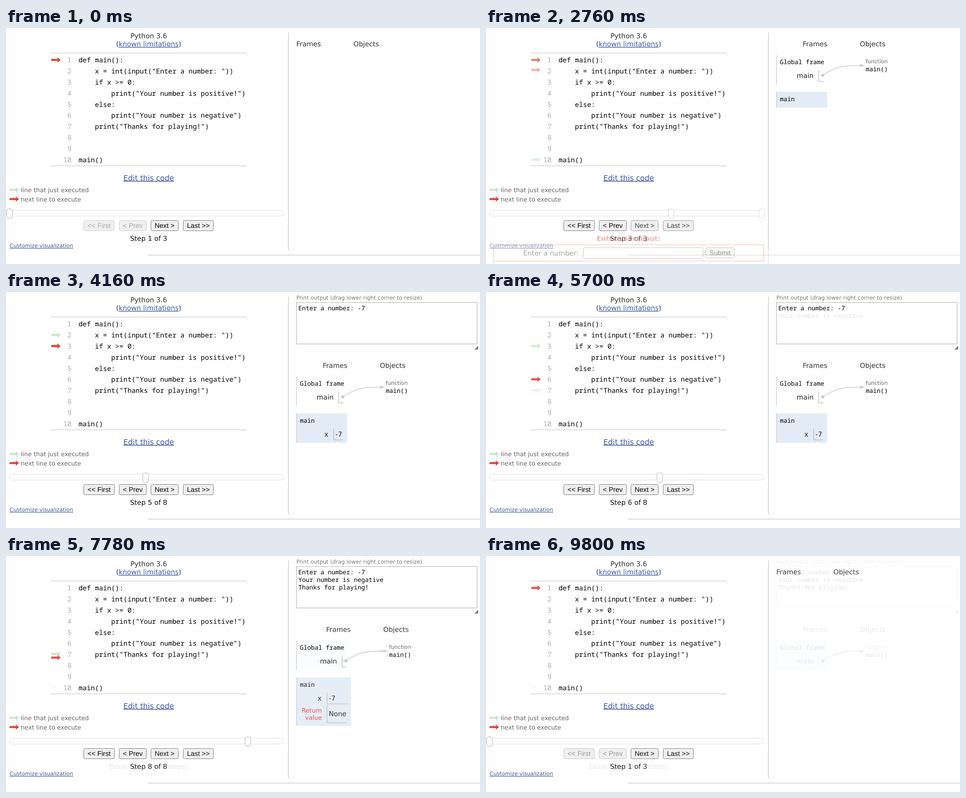
An HTML page for the animation above (9.86 s loop, 1058 px wide and 529 px high).

```html
<!DOCTYPE html>
<html lang="en">
<head>
<meta charset="utf-8">
<title>Code stepper</title>
<style>
html, body { margin: 0; width: 100%; height: 100%; overflow: hidden; background: #fff; }
svg { position: absolute; left: 0; top: 0; background: #fff; }
text { white-space: pre; text-rendering: geometricPrecision; font-family: "DejaVu Sans", Verdana, sans-serif; }
.mono { font-family: "Noto Sans Mono", Consolas, monospace; }
.btn { font-family: "Liberation Sans", Arial, sans-serif; }
</style>
</head>
<body>
<script>
const RED = '#e93f34', GREEN = '#c9e6ca', LINK = '#3d58a2', ACTIVE = '#e2ebf6';
const CODE = [
  'def main():',
  '    x = int(input("Enter a number: "))',
  '    if x >= 0:',
  '        print("Your number is positive!")',
  '    else:',
  '        print("Your number is negative")',
  '    print("Thanks for playing!")',
  '', '', 'main()'
];
const OUTPUT = ['Enter a number: -7', 'Your number is negative', 'Thanks for playing!'];

// green / red: line of each arrow; active: highlighted frame; out: printed lines
const STATES = [
  { red: 1, step: 1, total: 3 },
  { green: 1, red: 10, step: 2, total: 3, active: 'global' },
  { green: 10, red: 1, step: 3, total: 3, active: 'main' },
  { green: 1, red: 2, redShift: -2.4, step: 4, total: 3, active: 'main', input: true },
  { green: 2, red: 3, step: 5, total: 8, active: 'main', out: 1 },
  { green: 3, red: 6, step: 6, total: 8, active: 'main', out: 1 },
  { green: 6, red: 7, step: 7, total: 8, active: 'main', out: 2 },
  { green: 7, greenShift: -1.2, red: 7, redShift: 7.2, step: 8, total: 8, active: 'main', out: 3, returned: true },
  { green: 10, step: 9, total: 8, active: 'global', out: 3 }
];

const esc = s => s.replace(/&/g, '&amp;').replace(/</g, '&lt;');
const text = (x, y, size, s, fill = '#222', attrs = '') =>
  `<text x="${x}" y="${y}" font-size="${size}" fill="${fill}" ${attrs}>${esc(s)}</text>`;
const mono = (x, y, size, s, fill = '#000', attrs = '') => text(x, y, size, s, fill, 'class="mono" ' + attrs);
const rect = (x, y, w, h, fill, stroke = 'none', r = 0, sw = 1) =>
  `<rect x="${x}" y="${y}" width="${w}" height="${h}" rx="${r}" fill="${fill}" stroke="${stroke}" stroke-width="${sw}"/>`;
const path = (d, stroke, sw = 1) => `<path d="${d}" fill="none" stroke="${stroke}" stroke-width="${sw}"/>`;
const pointer = (x, y, fill) =>
  `<path transform="translate(${x} ${y}) scale(1.17)" d="M0-2H12V-5L18 0L12 5V2H0Z" fill="${fill}"/>`;
const lineY = n => 71.5 + 24.85 * (n - 1);
const MID = 'text-anchor="middle"', END = 'text-anchor="end"';

function button(x, y, w, label, off) {
  return rect(x + .5, y + .5, w - 1, 23, '#efefef', off ? '#d0d0d0' : '#767676', 3) +
    text(x + w / 2, y + 16.7, 15.2, label, off ? '#aaa' : '#000', 'class="btn" ' + MID);
}

function codePanel(s) {
  let g = text(318.5, 23.3, 15.2, 'Python 3.6', '#333', MID) +
    `<text x="318.5" y="41.3" font-size="15.1" fill="#333" ${MID}>(<tspan fill="${LINK}" text-decoration="underline">known limitations</tspan>)</text>` +
    path('M100 56H537M100 309H537', '#d3d3d3', 1.5);
  CODE.forEach((line, i) => {
    const y = lineY(i + 1) + 5.6, src = line.trimStart();
    g += mono(146, y, 15.17, String(i + 1), '#aaa', END) +
      mono(162 + 9.1 * (line.length - src.length), y, 15.17, src);
  });
  if (s.green) g += pointer(101, lineY(s.green) + (s.greenShift || 0), GREEN);
  if (s.red) g += pointer(101, lineY(s.red) + (s.redShift || 0), RED);
  return g + text(318.5, 341.6, 16.6, 'Edit this code', LINK, MID + ' text-decoration="underline"') +
    pointer(8, 363, GREEN) + text(33, 368, 13.55, 'line that just executed', '#666') +
    pointer(8, 383.5, RED) + text(33, 389, 13.55, 'next line to execute', '#666');
}

function controls(s) {
  const first = s.step == 1, last = s.step > s.total;
  const x = 7.7 + 608 * (s.step - 1) / s.total;
  let g = rect(8.5, 408.5, 610, 13, '#fff', '#ddd', 5) +
    rect(x - 6.2, 405.5, 12.5, 21, '#fff', '#aaa', 4) +
    button(173, 431, 69.5, '<< First', first) + button(252, 431, 62, '< Prev', first) +
    button(323, 431, 62, 'Next >', last) + button(395, 431, 68.5, 'Last >>', last);
  if (s.input) {
    return g + text(318, 477, 14.85, 'Enter user input:', RED, MID + ' font-weight="bold"') +
      rect(17, 486, 603, 36.5, 'none', '#ea6a60', 0, 1.2) +
      text(206.5, 509.5, 15.17, 'Enter a number:', '#222', END) +
      rect(217.5, 492.5, 267, 24, '#fff', '#767676', 3) + button(490, 492, 65, 'Submit');
  }
  const label = last ? `Done running (${s.total} steps)` : `Step ${s.step} of ${s.total}`;
  return g + text(318.5, 477, 15.2, label, '#111', MID) +
    text(8, 492.3, 12, 'Customize visualization', LINK, 'text-decoration="underline"') +
    path('M317 509H1058', '#ccc', 1.6);
}

function output(count) {
  return text(648, 17.3, 12.15, 'Print output (drag lower right corner to resize)', '#777') +
    rect(648.5, 23.5, 403, 93, '#fff', '#aaa') +
    '<path d="M1054 120V129H1045Z" fill="#888"/>' +
    OUTPUT.slice(0, count).map((line, i) => mono(652.5, 40.5 + 17.3 * i, 13.77, line)).join('');
}

// Stack frames and the function object, laid out as if no output box were above
function heap(s) {
  const dx = s.returned ? 7.5 : 0, global = s.active == 'global';
  const left = s.active ? 707 + dx : 648;
  let g = text(left, 40.5, 15.1, 'Frames', '#333') + text(left + 127.5, 40.5, 15.1, 'Objects', '#333');
  if (!s.active) return g;
  const wire = global ? '#24599b' : '#ccc';
  if (global) g += rect(648, 60.5, 113.5, 66, ACTIVE);
  g += path('M648.5 60.5V126.5', '#bbb') +
    mono(656, 80.7, 13.77, 'Global frame') +
    `<g transform="translate(${dx} 0)">` +
    text(693.5, 112, 15.1, 'main') +
    path('M742.5 94V119.5H753', '#aaa') +
    `<circle cx="751.5" cy="106" r="3.6" fill="${wire}"/>` +
    path('M751.5 106C782 86 795 84 836 84', wire, 1.5) +
    `<path d="M846 84L833.5 80L836.5 84L833.5 88Z" fill="${wire}"/>` +
    text(847.5, 79, 12, 'function', '#666') + mono(847.5, 96.8, 13.77, 'main()') + '</g>';
  if (global) return g;
  g += rect(648, 143, s.returned ? 122 : 113.5, s.returned ? 108.5 : s.out ? 66 : 35.5, ACTIVE) +
    path(`M648.5 143v${s.returned ? 108.5 : s.out ? 66 : 35.5}`, '#bbb') +
    mono(656, 163.5, 13.77, 'main');
  if (s.out) {
    const x = s.returned ? 716.5 : 731.5;
    g += text(x - 12, 195, 15.1, 'x', '#222', END) + text(x + 4, 195.3, 15.1, '-7') +
      path(`M${x} 177V202.5H${s.returned ? 761 : 752}`, '#aaa');
  }
  if (s.returned) {
    g += text(705, 221.5, 13.6, 'Return', RED, END) + text(705, 238, 13.6, 'value', RED, END) +
      text(720.5, 229.7, 15.1, 'None') + path('M716.5 205V244.5H761', '#aaa');
  }
  return g;
}

document.body.innerHTML = STATES.map(s =>
  `<svg width="1058" height="529" viewBox="0 0 1058 529">` +
  codePanel(s) + controls(s) +
  path(`M630.5 11V${s.input ? 529 : 498}`, '#ccc', 1.6) +
  (s.out ? output(s.out) : '') +
  `<g transform="translate(0 ${s.out ? 129.2 : 0})">${heap(s)}</g></svg>`).join('');

const layers = [...document.querySelectorAll('svg')];
const LOOP = 9860, SLOT = 1040, LAST = STATES.length - 1;

// Each slot holds its state, then dissolves to the next in 60 ms steps of a tenth
function draw(now) {
  const t = now % LOOP;
  const i = Math.min(LAST, Math.floor(t / SLOT)), next = (i + 1) % layers.length;
  const fade = t - i * SLOT - (i == LAST ? 1000 : 500);
  const mix = fade < 0 ? 0 : Math.min(1, (Math.floor(fade / 60) + 1) / 10);
  layers.forEach((el, k) => {
    el.style.visibility = k == i || (k == next && mix) ? 'visible' : 'hidden';
    el.style.opacity = k == next ? mix : 1;
    el.style.zIndex = k == next ? 1 : 0;
  });
  requestAnimationFrame(draw);
}
draw(0);
</script>
</body>
</html>
```
